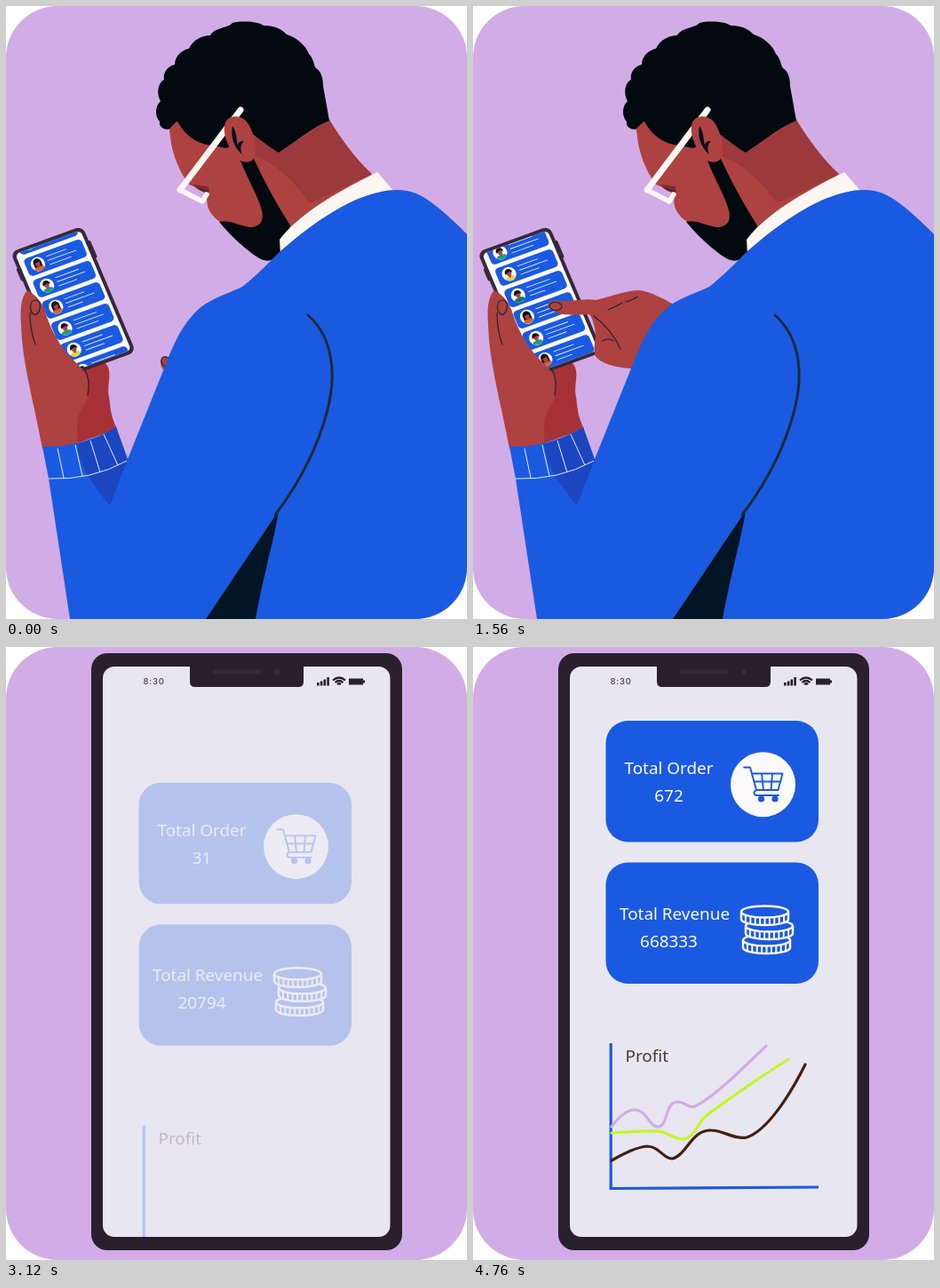
An HTML page that plays this animation: 519 px wide and 690 px high, repeating every 4800 ms.

```html
<!DOCTYPE html>
<html lang="en">
<head>
<meta charset="utf-8">
<title>Sales at a glance</title>
<style>
html, body { margin: 0; width: 100%; height: 100%; overflow: hidden; background: #fff; }
svg { display: block; width: 100vw; height: 100vh; }
text { font-family: "Noto Sans", sans-serif; font-size: 18.9px; font-weight: 500; }
.label { fill: #fdfafc; text-anchor: middle; }
.ink { fill: none; stroke: #20232f; stroke-width: 1.2; stroke-linecap: round; }
.curve { fill: none; stroke-width: 3.2; stroke-linecap: round; }
</style>
</head>
<body>
<svg viewBox="0 0 519 690">
  <defs>
    <clipPath id="stage"><rect width="519" height="690" rx="58"/></clipPath>
    <clipPath id="screen"><rect x="4" y="4" width="78.2" height="145.5" rx="5"/></clipPath>
    <clipPath id="display"><rect x="109" y="22" width="323.5" height="642" rx="13"/></clipPath>
  </defs>
  <g clip-path="url(#stage)">
    <rect width="519" height="690" fill="#d2ace7"/>

    <g id="man">
      <!-- head -->
      <path fill="#ad4240" d="M183 132 L186 155C190 175 198 190 206 201L228 209C224 220 226 233 241 243L300 270L330 260L412 190C394 173 376 148 364 128L300 100H220Z"/>
      <path fill="#9b393c" d="M276 168C295 172 320 190 342 222L412 189C394 173 376 148 364 128L308 165C300 160 290 150 282 142Z"/>
      <path fill="#7d2a2f" d="M210 201L228 203L229 211C221 210 214 206 210 201Z"/>
      <path fill="#020a10" d="M191 131L183 139C176 139 172 135 173 130C167 124 168 112 174 107C169 99 171 86 178 83C176 74 184 67 190 66C190 55 200 49 206 48C210 38 222 33 230 33C235 24 250 25 255 19C268 16 285 18 290 22C305 22 312 28 316 32C328 36 338 45 341 54C347 60 346 66 349 70C356 74 357 84 357 90L364 129C344 137 326 153 307 165C298 160 288 152 279 145L248 160L232 157C214 155 202 146 193 130Z"/>
      <path fill="#020a10" d="M264 174C272 195 283 212 288 230C291 243 285 249 274 249C262 247 250 240 240 243C252 258 270 274 282 282C290 288 298 288 303 283L312 276L320 247C306 225 292 200 279 172Z"/>
      <path fill="none" stroke="#fef6f2" stroke-width="7" stroke-linecap="round" stroke-linejoin="round" d="M264 117L196 207"/>
      <path fill="none" stroke="#fef6f2" stroke-width="5.5" stroke-linecap="round" stroke-linejoin="round" d="M196 207L221 220L226 212"/>
      <path class="ink" stroke-width="2" d="M218 206L227 209"/>
      <path fill="#ad4240" d="M246 136C246 122 265 120 273 133C280 145 285 166 278 173C270 180 258 173 252 160C247 150 245 142 246 136Z"/>
      <path fill="#071019" d="M255 135C252 148 258 161 266 167C264 162 263 157 268 152C263 152 261 154 261 157C259 149 260 142 255 135Z"/>

      <!-- phone in the left hand -->
      <path fill="#a63237" d="M70 395L112 402C121 412 113 425 116 440C118 455 118 462 125 476L70 496Z"/>
      <g transform="matrix(.94 -.342 .392 .925 5 277)">
        <rect x="-1.5" y="20" width="4" height="15" rx="1.5" fill="#38283c"/>
        <rect x="84" y="18" width="4" height="21" rx="1.5" fill="#38283c"/>
        <rect width="86.2" height="153.500" rx="8" fill="#38283c"/>
        <g clip-path="url(#screen)">
          <rect width="86" height="153" fill="#fefcff"/>
          <g id="list"></g>
        </g>
      </g>
      <g id="hand">
        <path id="skin" fill="#ad4240"/>
        <path id="creases" class="ink"/>
      </g>
      <path fill="#ad4240" d="M24 320C16 328 16 345 17 358C18 400 30 440 41 498Q60 500 81 495C80 480 78 464 86 452C92 445 95 432 92 420C90 410 78 402 68 390C58 378 50 362 45 347C42 335 34 325 24 320Z"/>
      <path class="ink" d="M27 345C27 360 29 370 33 381M88 408C94 418 94 428 92 438M33 331C38 331 39 336 38 341C37 347 33 349 30 346C26 342 27 331 33 331Z"/>

      <!-- sweater -->
      <path fill="#fef6f1" d="M308 263C325 240 360 215 418 187L437 209L309 280Z"/>
      <path fill="#1a5ae0" d="M41 496Q85 497 124 474L137 510L182 398C192 372 205 348 225 335C240 326 254 322 266 316C280 305 296 289 310 275C340 249 385 214 430 207.500C452 205 466 211 480 222C494 232 507 245 519 257V690H72L48 532Z"/>
      <path fill="#1b46c0" d="M80 493Q104 487 124 474L137 511L117 562C98 540 82 518 80 493Z"/>
      <path fill="none" stroke="#dfe6fb" stroke-width="1" d="M48 532Q96 534 136 512M58 498L65 531M78 494L86 529M95 489L106 525M110 482L126 517"/>
      <path fill="#021524" d="M225 690L307 568C302 600 290 640 281 690Z"/>
      <path fill="none" stroke="#1b2a3b" stroke-width="3" stroke-linecap="round" d="M340 348C370.500 375 372 420 360.500 460C348 505 324 545 303 573"/>
    </g>

    <g id="report">
      <rect x="96" y="7" width="350" height="672" rx="18" fill="#291f2d"/>
      <rect x="109" y="22" width="323.500" height="642" rx="13" fill="#e8e6f0"/>
      <path fill="#291f2d" d="M207 20H335V39Q335 45 329 45H213Q207 45 207 39Z"/>
      <rect x="233" y="25.500" width="54" height="5" rx="2.500" fill="#352a39"/>
      <circle cx="305" cy="28" r="3" fill="#352a39"/>
      <text x="154.500" y="41.500" fill="#47404c" style="font:500 9.500px Inter,sans-serif;letter-spacing:.8px">8:30</text>
      <path fill="#291f2d" d="M350 40h2.600v3.500h-2.600zM353.800 38.500h2.600v5h-2.600zM357.500 36.500h2.600v7h-2.600zM361.300 34h2.600v9.500h-2.600zM386 35.500h16v7h-16zM402 37.500h2v3h-2z"/>
      <path fill="none" stroke="#291f2d" stroke-width="2.200" d="M368 37.500Q375 31.500 382 37.500M370.500 40Q375 36 379.500 40M373 42Q375 40.500 377 42"/>

      <g clip-path="url(#display)">
        <g id="cards">
          <rect x="149.500" y="83" width="239.500" height="136.500" rx="25" fill="#1a5ae0"/>
          <rect x="149.500" y="242.500" width="239.500" height="136.500" rx="25" fill="#1a5ae0"/>
          <text class="label" x="220.500" y="143">Total Order</text>
          <text class="label" x="220.500" y="174" id="orders"></text>
          <text class="label" x="227" y="306.500">Total Revenue</text>
          <text class="label" x="220.500" y="337.500" id="revenue"></text>
          <circle cx="326.500" cy="154.800" r="36.500" fill="#fdfafc"/>
          <path fill="none" stroke="#1a5ae0" stroke-width="1.900" stroke-linecap="round" stroke-linejoin="round" d="M305 135.500H312L319 161H343.500L348.500 142.500H314M316.500 151.500H346M325 142.500L327 161M337 142.500L335.500 161M319 161C315 163 316 167 320 167H344"/>
          <circle cx="324.500" cy="171" r="3.600" fill="#1a5ae0"/>
          <circle cx="340" cy="171" r="3.600" fill="#1a5ae0"/>
          <g id="coins" fill="#1a5ae0" stroke="#fdfafc" stroke-width="2.500"></g>
        </g>

        <g id="chart">
          <path fill="none" stroke="#1a5ae0" stroke-width="3.200" d="M155.200 446V609.500L389 608"/>
          <text x="171.500" y="467" fill="#55342c">Profit</text>
          <path class="curve" stroke="#d2ace7" pathLength="1" d="M156 540C164 529 172 521 182 521C196 521 198 540 208 540C220 540 216 512 230 512C240 512 242 520 250 517C270 507 295 483 330 449"/>
          <path class="curve" stroke="#c2f822" pathLength="1" d="M156 547C175 546 190 544 208 545C220 546 226 554 236 554C250 553 252 536 262 528C290 507 320 486 355 464"/>
          <path class="curve" stroke="#42200f" pathLength="1" d="M156 578C172 569 184 563 196 562C210 562 214 576 224 576C240 573 246 543 268 544C282 544 295 555 308 552C330 545 355 508 374 470"/>
        </g>
      </g>
    </g>
  </g>
</svg>
<script>
const $ = id => document.getElementById(id);
const LOOP = 4800, STEP = 40, CUT = 3000, PITCH = 26;
const clamp = v => Math.min(1, Math.max(0, v));
const span = (t, a, b) => clamp((t - a) / (b - a));
const ease = u => (1 - Math.cos(Math.PI * u)) / 2;

// Finger outlines share one structure so they can be blended
const UP = {
  skin: "M112 297C112 290 120 289 126 293C142 306 160 319 174 332C182 321 198 318 208 317C218 319 230 327 240 334L215 400L185 402C168 400 158 394 156 383C155 370 157 360 160 347C146 334 128 316 116 305C113 302 112 300 112 297Z",
  creases: "M115 293a7 5 45 1 1 10 10a7 5 45 1 1 -10 -10M158 345Q176 360 186 381M165 373Q171 369 178 372M174 332Q184 329 194 334M190 326Q198 323 204 329"
};
const FLAT = {
  skin: "M84 338C84 331 92 331 101 332C118 332 130 329 138 331C152 328 172 320 188 320C200 322 214 329 226 336L200 408L178 408C160 407 143 402 138 394C134 384 140 375 137 362C134 350 132 347 130 347C118 348 104 348 95 346C88 345 84 343 84 338Z",
  creases: "M86 338a7 4.5 3 1 1 14 0a7 4.5 3 1 1 -14 0M136 349Q156 364 166 386M146 377Q152 373 158 377M152 342Q160 339 168 334M172 333Q180 331 185 327"
};
const DOWN = {
  skin: "M96 366C96 359 105 358 112 363C122 371 134 377 144 384C160 385 178 371 194 370C200 370 206 375 210 380L190 455L160 454C150 452 142 445 141 436C140 425 142 418 144 411C132 402 112 386 99 374C97 372 96 369 96 366Z",
  creases: "M98 361a7 5 45 1 1 10 10a7 5 45 1 1 -10 -10M142 402Q158 416 168 431M150 426Q156 422 163 426M160 388Q168 385 176 386M174 381Q182 377 189 377"
};
// time, pose, shift x, shift y
const KEYS = [
  [40, DOWN, 78, 35], [280, FLAT], [520, FLAT], [880, UP], [920, UP],
  [1040, FLAT], [1400, UP], [1440, UP], [1560, FLAT], [1920, UP],
  [2080, UP], [2560, DOWN], [2760, DOWN], [2860, DOWN, -4, -4], [2960, DOWN]
];

function blend(a, b, u) {
  const to = b.match(/-?[\d.]+/g);
  let i = 0;
  return a.replace(/-?[\d.]+/g, n => +(+n + (to[i++] - n) * u).toFixed(2));
}

function moveHand(t) {
  let i = 0;
  while (i < KEYS.length - 2 && t >= KEYS[i + 1][0]) i++;
  const [t0, from, x0 = 0, y0 = 0] = KEYS[i];
  const [t1, to, x1 = 0, y1 = 0] = KEYS[i + 1];
  const u = ease(span(t, t0, t1));
  for (const part of ["skin", "creases"])
    $(part).setAttribute("d", blend(from[part], to[part], u));
  $("hand").setAttribute("transform", `translate(${x0 + (x1 - x0) * u} ${y0 + (y1 - y0) * u})`);
}

function scrollAt(t) {
  if (t < 520) return 0;
  if (t < 2080) {
    const p = (t - 520) / 520, n = Math.floor(p);
    return 46 * (n + ease(p - n));
  }
  return 138 - 91 * ease(span(t, 2120, 2760));
}

// Contacts: long hair, teal, yellow and dark green shirts
const SHIRT = { G: "#d9622f", M: "#17a283", Y: "#e6d832", D: "#0d7a55" };
function contact(i) {
  const kind = "GMGMYD"[(i + 6) % 6];
  const hair = kind === "G"
    ? "M-4.500 5V-2C-4-8 4-8 4.500-2V5Z"
    : "M-4-.5C-5-7 4-8 4.200-1Z";
  return `<g transform="translate(23.200 ${23.2 + i * PITCH})">
    <rect x="-13.500" y="-10.700" width="69" height="21.400" rx="4.500" fill="#1a5ae0"/>
    <circle r="8" fill="#fdfafc"/>
    <path d="${hair}" fill="#0a0c14"/>
    <path d="M-6 5.300C-5 1.500 5 1.500 6 5.300Q0 10.500-6 5.300Z" fill="${SHIRT[kind]}"/>
    <path d="M-1.200 1h2.400v3h-2.400z" fill="#ad4240"/>
    <ellipse cy="-.8" rx="2.700" ry="3.500" fill="#ad4240"/>
    <path d="M-2.800-1.500C-3-5.500 3-5.500 2.800-2.500Z" fill="#0a0c14"/>
    <path d="M12-5H${36 + i % 2 * 4}M12 0H46M12 5H${38 - i % 3 * 4}" stroke="#dfe7fc" stroke-width=".9"/>
  </g>`;
}
$("list").innerHTML = Array.from({ length: 14 }, (_, i) => contact(i - 1)).join("");

function coin(x, y) {
  let ticks = "";
  for (let k = -4; k <= 4; k++) {
    const dx = k * 5.4, dy = 7 * Math.sqrt(1 - (dx / 27) ** 2);
    ticks += `M${x + dx} ${y + dy}v8`;
  }
  return `<path d="M${x - 26.5} ${y}v8.500a26.500 6.500 0 0 0 53 0v-8.500"/>
    <path d="${ticks}" stroke-width="2"/>
    <ellipse cx="${x}" cy="${y}" rx="26.500" ry="6.500"/>`;
}
$("coins").innerHTML = coin(330.5, 330) + coin(333.5, 314) + coin(328.5, 298);

const curves = document.querySelectorAll(".curve");

function rise(el, t, dist) {
  const y = dist * (1 - span(t, 3040, 3440)) ** 2.5;
  el.setAttribute("transform", `translate(0 ${y})`);
  el.setAttribute("opacity", span(t, 3040, 3370));
}

function showReport(t) {
  rise($("cards"), t, 122);
  rise($("chart"), t, 162);
  const dt = (t - 3320) / 1440;
  $("orders").textContent = Math.max(0, Math.round(109 + 563 * dt));
  $("revenue").textContent = Math.max(0, Math.round(99762 + 568571 * dt));
  curves.forEach((c, i) => {
    const start = 3400 + 440 * i, u = span(t, start, start + 480);
    c.setAttribute("visibility", u ? "visible" : "hidden");
    c.setAttribute("stroke-dasharray", u < 1 ? `${u} 2` : "none");
  });
}

function draw(t) {
  const late = t >= CUT;
  $("man").style.display = late ? "none" : "";
  $("report").style.display = late ? "" : "none";
  if (late) return showReport(t);
  $("list").setAttribute("transform", `translate(0 ${-scrollAt(t)})`);
  moveHand(t);
}

// Time advances in 40 ms steps, with a little slack for timer jitter
const begin = performance.now();
function tick() {
  const steps = Math.floor((performance.now() - begin + 5) / STEP);
  draw(steps * STEP % LOOP);
  requestAnimationFrame(tick);
}
tick();
</script>
</body>
</html>
```
